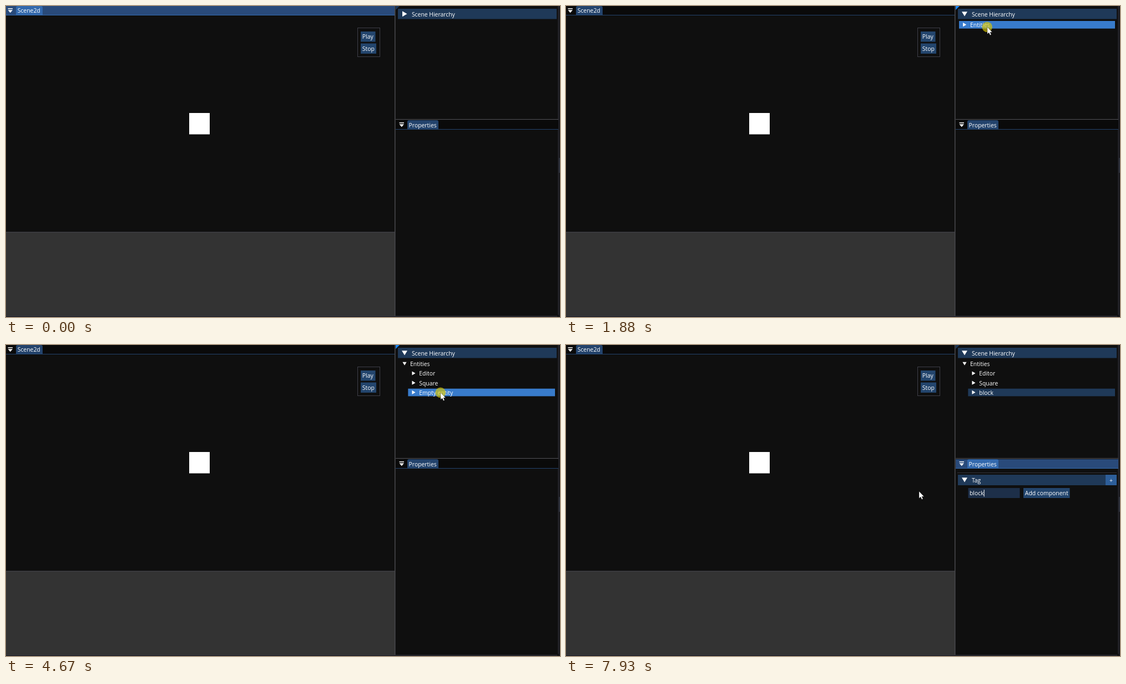
Recreate the animation shown at these times as an HTML page with a canvas. Size 998x561 px, loop 8000 ms.

```html
<!DOCTYPE html>
<html lang="en">
<head>
<meta charset="utf-8">
<title>Scene editor</title>
<style>
  html, body { margin: 0; height: 100%; overflow: hidden; background: #0f0f0f; }
  canvas { display: block; width: 998px; height: 561px; }
</style>
</head>
<body>
<canvas id="stage"></canvas>
<script>
const W = 998, H = 561, LOOP = 8000;
const canvas = document.getElementById('stage');
const ctx = canvas.getContext('2d');
const dpr = window.devicePixelRatio || 1;
canvas.width = W * dpr;
canvas.height = H * dpr;

const C = {
  bg: '#0f0f0f', border: '#3e3e47', button: '#23456d', frame: '#1d2f49',
  header: '#1f3958', hover: '#387bcb', hot: '#4296fa', select: '#2a5387',
  titleOn: '#294a7a', titleOff: '#0a0a0a', tabOn: '#3369ad', tabOff: '#23436c'
};

// Pointer path: time, x, y
const path = [
  [190, 800, 540], [500, 790, 170], [800, 761, 16], [940, 762, 15], [1150, 762, 15],
  [1480, 759, 38], [2080, 759, 38], [2630, 789, 103], [2840, 789, 103],
  [3320, 790, 111], [3900, 790, 111], [4270, 800, 156], [4600, 783, 86],
  [4800, 783, 86], [5070, 843, 248], [5290, 793, 281], [5500, 793, 281],
  [5630, 801, 264], [5900, 622, 264], [5980, 627, 264]
];
const presses = [[1010, 1150], [1880, 2020], [2700, 2840], [3520, 3640], [4670, 4800], [5620, 5960]];
const keys = [[6580, 'b'], [6710, 'bl'], [6860, 'blo'], [7000, 'bloc'], [7200, 'block']];

function pointer(t) {
  if (t >= 7930) return [636, 264];
  let i = path.findIndex(p => p[0] > t);
  if (i < 0) i = path.length;
  const a = path[Math.max(0, i - 1)], b = path[i] || a;
  const k = b === a ? 0 : Math.max(0, (t - a[0]) / (b[0] - a[0]));
  const e = k * k * (3 - 2 * k);
  return [a[1] + (b[1] - a[1]) * e, a[2] + (b[2] - a[2]) * e];
}

function rect(x, y, w, h, color) {
  ctx.fillStyle = color;
  ctx.fillRect(x, y, w, h);
}

function outline(x, y, w, h, color) {
  ctx.strokeStyle = color;
  ctx.lineWidth = 1;
  ctx.strokeRect(x + .5, y + .5, w - 1, h - 1);
}

function poly(color, ...pts) {
  ctx.fillStyle = color;
  ctx.beginPath();
  for (let i = 0; i < pts.length; i += 2) ctx.lineTo(pts[i], pts[i + 1]);
  ctx.closePath();
  ctx.fill();
}

function text(s, x, y) {
  ctx.fillStyle = '#fff';
  ctx.fillText(s, x, y);
}

function arrow(x, y, r, open) {
  if (open) poly('#fff', x - r, y - r * .8, x + r, y - r * .8, x, y + r * .85);
  else poly('#fff', x - r * .8, y - r, x + r * .9, y, x - r * .8, y + r);
}

function titleBar(x, y, w, name, tabW, active) {
  const tab = active ? C.tabOn : C.tabOff;
  rect(x, y, w, 17, active ? C.titleOn : C.titleOff);
  ctx.fillStyle = tab;
  ctx.beginPath();
  ctx.roundRect(x + 18 + (x ? 3 : 0), y, tabW, 17, [3, 3, 0, 0]);
  ctx.fill();
  rect(x, y + 16, w, 1, tab);
  const ix = x ? x + 6.5 : 3.5;
  rect(ix, y + 4, 8.5, 1.5, '#fff');
  poly('#fff', ix, y + 7.3, ix + 8.5, y + 7.3, ix + 4.25, y + 12.3);
  text(name, x ? x + 23.6 : 20.7, y + (x ? 13.1 : 12.4));
}

function draw(t) {
  const [px, py] = pointer(t);
  const pressed = presses.some(([a, b]) => t >= a && t < b);
  const popup = t >= 2840 && t < 3640;
  const dragging = t >= 5620 && t < 5960;
  const over = (x, y, w, h) => t >= 190 && !popup && !dragging &&
    px >= x && px < x + w && py >= y && py < y + h;
  const typed = keys.filter(k => k[0] <= t).pop();
  const name = typed ? typed[1] : 'Empty entity';

  ctx.setTransform(dpr, 0, 0, dpr, 0, 0);
  ctx.font = '10.4px "Open Sans", "Noto Sans", sans-serif';
  rect(0, 0, W, H, C.bg);

  // Scene view
  titleBar(0, 0, 700, 'Scene2d', 48, t < 1010);
  rect(330, 193, 37, 38.5, '#fff');
  rect(0, 408, 700, 151, '#333');
  rect(0, 407.5, 700, 1, '#4c4c55');
  outline(633, 39, 41, 53, C.border);
  rect(639, 46, 26.5, 18.5, C.button);
  rect(639, 67.5, 28, 18.5, C.button);
  text('Play', 641.8, 59.2);
  text('Stop', 641.8, 80.8);

  // Window edges
  rect(700, 0, 1.5, 560, '#4a4a4e');
  rect(995, 0, 3, H, '#17171b');
  rect(996, 274, 2, 27, '#2b2f3a');
  rect(0, 559, W, 2, '#17171b');
  rect(0, 559, 993, 1, '#34343f');
  rect(994.5, 0, 1, 557, '#34343f');

  // Hierarchy
  const focus = t >= 1010 && t < 5620 && !popup;
  poly(focus ? '#1a86f5' : '#1b3557', 702, 0, 709, 0, 702, 7);
  rect(706, 5, 286, 18.5, over(706, 5, 286, 18.5) ? C.hover : C.header);
  arrow(718, 14.3, 5, t >= 1150);
  text('Scene Hierarchy', 730.9, 18.6);

  function row(label, x, y, selected) {
    const hit = over(x, y - 2, 989 - x, 17);
    if (hit || selected) rect(x, y, 989 - x, 13.7, hit ? C.hover : C.header);
    const root = label === 'Entities';
    arrow(x + 10, y + 6.7, 3.6, root && t >= 2020);
    text(label, x + 20, y + 11);
  }
  if (t >= 1150) row('Entities', 708, 27);
  if (t >= 2020) {
    row('Editor', 724.3, 44.3);
    row('Square', 724.3, 61.5);
  }
  if (t >= 3640) row(name, 724.3, 78.7, t >= 4740);

  // Properties
  rect(702, 204, 293, 1, '#505055');
  titleBar(702, 206, 293, 'Properties', 56, t >= 5620);
  if (t >= 4740) {
    rect(705, 230, 287, 1, '#33333b');
    rect(706, 234, 286, 19, over(706, 234, 266, 19) ? C.hover : C.header);
    rect(972, 234, 20, 19, '#2d5e99');
    arrow(718, 243.3, 5, true);
    text('Tag', 730.9, 247.7);
    text('+', 979, 247.7);
    rect(724.5, 258, 93, 18, C.frame);
    if (t >= 5620 && !typed) {
      const start = Math.max(727, Math.min(788, px));
      rect(start, 260.5, 788 - start, 13.5, C.select);
    }
    text(name, 727, 271);
    if (typed) rect(727 + ctx.measureText(name).width, 261, 1, 12.5, '#fff');
    rect(824, 258, 83.5, 18, over(824, 258, 83.5, 18) ? C.hot : C.button);
    text('Add component', 826.8, 271);
  }

  if (popup) {
    rect(790, 103, 104, 23, '#141414');
    outline(790, 103, 104, 23, C.border);
    if (py > 106) rect(792, 107, 100, 15, C.hover);
    text('Create empty entity', 794, 118);
  }

  if (pressed) {
    ctx.fillStyle = 'rgba(220,200,0,.65)';
    ctx.beginPath();
    ctx.arc(px - .3, py - .2, 9.3, 0, 7);
    ctx.fill();
  }
  if (t >= 190) {
    ctx.save();
    ctx.translate(px, py);
    poly('#fff', 0, 0, 0, 12.6, 2.9, 10, 4.9, 14.6, 7, 13.7, 5, 9.2, 8.9, 9.2);
    ctx.strokeStyle = 'rgba(0,0,0,.6)';
    ctx.lineWidth = .5;
    ctx.stroke();
    ctx.restore();
  }
}

function tick() {
  draw(performance.now() % LOOP);
  requestAnimationFrame(tick);
}
tick();
</script>
</body>
</html>
```
